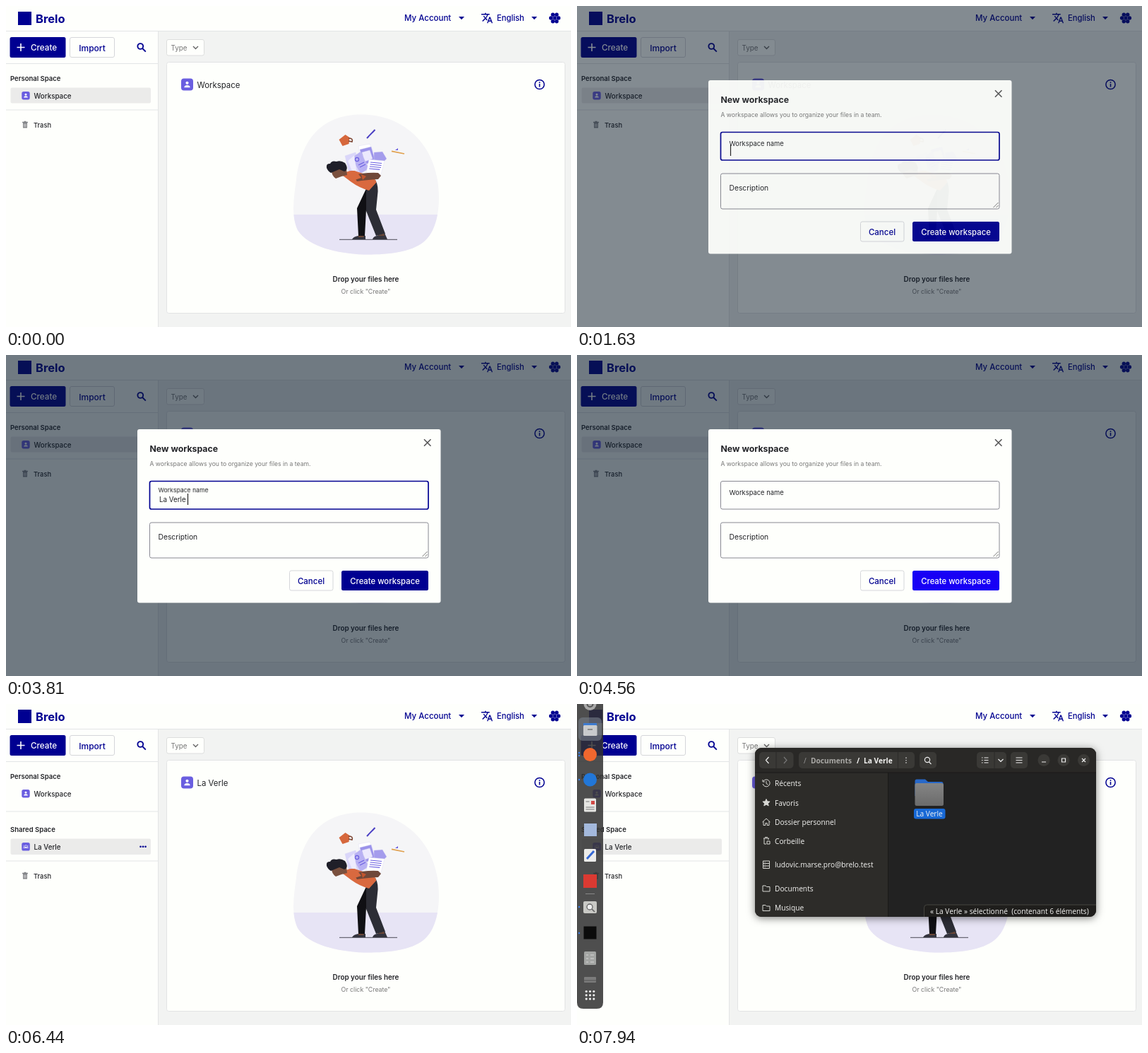
These frames come from a looping animation (800x454 px, 8 s). An HTML page:

```html
<!DOCTYPE html>
<html lang="en">
<head>
<meta charset="utf-8">
<title>File workspace</title>
<style>
html, body { margin: 0; width: 100%; height: 100%; overflow: hidden; background: #fefffc; }
svg { display: block; }
text { font-family: Inter, sans-serif; dominant-baseline: central; fill: #222327; font-size: 9.8px; font-weight: 500; white-space: pre; }
.b { font-weight: 600; font-size: 9.5px; }
.h { font-size: 11.4px; font-weight: 400; }
.navy { fill: #000091; }
.inv { fill: #fff; }
.soft { fill: #777; font-weight: 400; }
.mid { text-anchor: middle; }
.sys text { font-family: "Open Sans", "Noto Sans", sans-serif; font-size: 10.2px; fill: #f5f5f3; font-weight: 400; }
.sys .bold { font-weight: 700; }
.line { fill: none; stroke: #e3e5e6; }
.ico { fill: none; stroke: #d8d8d4; stroke-width: 1; }
#win { transform-box: fill-box; transform-origin: center; }
#label { transform-origin: 215.5px 194px; }
</style>
</head>
<body>
<svg width="800" height="454" viewBox="0 0 800 454">
<defs>
  <g id="badge">
    <rect width="17" height="17" rx="4" fill="#6a5ee0"/>
    <circle cx="8.5" cy="6.3" r="2.1" fill="#fff"/>
    <path d="M4.3 12.7c0-4.4 8.4-4.4 8.4 0z" fill="#fff"/>
  </g>
  <g id="team">
    <rect width="11.5" height="11.5" rx="2.6" fill="#6a5ee0"/>
    <path d="M2.2 7.8c0-1.8 2.4-1.8 2.4 0zM4.5 7.8c0-2.6 2.7-2.6 2.7 0zM7 7.8c0-1.8 2.4-1.8 2.4 0z" fill="#fff"/>
    <path d="M3.4 5h.1M5.8 4h.1M8.2 5h.1" stroke="#fff" stroke-width="1.5" stroke-linecap="round"/>
  </g>
  <g id="bin">
    <path d="M-3-3H3V4.5H-3z" fill="#85868a"/>
    <path d="M-4-3.5H4M-1.5-4.6H1.5" stroke="#85868a" stroke-width="1.3"/>
    <path d="M-1.1-1.5V3M1.1-1.5V3" stroke="#eee" stroke-width=".9"/>
  </g>
  <path id="dir" class="ico" d="M-5-4h4l1.5 1.5h4.5v6.5h-10z"/>
  <path id="blob" d="M498 153.500C558 151 602 190 611 246C617 286 609 320 591 334C572 349 537 352 506 351.500C470 350 428 341 413 317C403 296 408 268 411 246C417 196 441 156 498 153.500Z"/>
  <clipPath id="blobClip"><use href="#blob"/></clipPath>
  <clipPath id="winClip"><rect x="252" y="62" width="483" height="239" rx="9"/></clipPath>
  <linearGradient id="steel" x1="0" y1="0" x2="0" y2="1"><stop stop-color="#858585"/><stop offset="1" stop-color="#6b6b6b"/></linearGradient>
  <filter id="shade" x="-20%" y="-20%" width="140%" height="150%"><feDropShadow dx="0" dy="2" stdDeviation="3" flood-opacity=".25"/></filter>
  <filter id="deep" x="-20%" y="-20%" width="140%" height="150%"><feDropShadow dx="0" dy="2" stdDeviation="6" flood-opacity=".5"/></filter>
</defs>

<rect width="800" height="454" fill="#fefffc"/>
<rect x="216" y="36" width="584" height="418" fill="#f2f3f2"/>
<path class="line" d="M0 35.500H800M215.500 36V454M0 81.500H215"/>

<!-- header -->
<rect x="17" y="8" width="19" height="19" fill="#000091"/>
<text x="42" y="17.500" class="navy" style="font-size:16.500px;font-weight:700">Brelo</text>
<text x="564" y="17" class="navy" style="font-size:11.500px">My Account</text>
<text x="695" y="17" class="navy" style="font-size:11.200px">English</text>
<path class="navy" d="M641 15h8l-4 4.200zM744 15h8l-4 4.200z"/>
<path class="navy" transform="translate(672.300 8.200) scale(.73)" d="M12.870 15.070l-2.540-2.510.030-.030A17.520 17.520 0 0 0 14.070 6H17V4h-7V2H8v2H1v2h11.170C11.500 7.920 10.440 9.750 9 11.350 8.070 10.320 7.300 9.190 6.690 8h-2c.730 1.630 1.730 3.170 2.980 4.560l-5.090 5.020L4 19l5-5 3.110 3.110.760-2.040zM18.500 10h-2L12 22h2l1.120-3h4.750L21 22h2l-4.500-12zm-2.620 7l1.620-4.330L19.120 17h-3.240z"/>
<g id="dots" class="navy"></g>

<!-- sidebar -->
<rect id="create" x="5.500" y="44" width="79" height="29" rx="2.500" fill="#000091"/>
<path d="M15.500 58.500h11M21 53v11" stroke="#fff" stroke-width="1.600"/>
<text x="35" y="59" class="inv" style="font-size:11.700px">Create</text>
<rect x="90.500" y="44.500" width="63" height="28" rx="2.500" fill="#fefffc" stroke="#d5d6da"/>
<text x="122" y="59" class="navy mid" style="font-size:12px">Import</text>
<g fill="none" stroke="#000091" stroke-width="1.900"><circle cx="190.300" cy="57" r="3.900"/><path d="M193.200 60l4.600 4.600"/></g>
<text x="6" y="102" class="b">Personal Space</text>
<rect id="rowA" x="6.500" y="115.500" width="198.500" height="22" rx="2" fill="#ebebea"/>
<use href="#badge" transform="translate(22.300 121) scale(.67)"/>
<text x="39.500" y="127">Workspace</text>
<g id="shared">
  <path class="line" d="M0 152H215"/>
  <text x="6" y="177" class="b">Shared Space</text>
  <rect id="rowB" x="6.500" y="190.500" width="198.500" height="22.500" rx="2" fill="#ebebea"/>
  <use href="#team" x="22.300" y="196"/>
  <text x="39.500" y="202">La Verle</text>
  <path id="more" d="M190.500 201.700h.1M194 201.700h.1M197.500 201.700h.1" stroke="#000091" stroke-width="2.600" stroke-linecap="round"/>
</g>
<g id="trash">
  <path class="line" d="M0 147H215"/>
  <use href="#bin" x="27" y="168"/>
  <text x="39" y="168" style="font-size:9.300px">Trash</text>
</g>

<!-- main panel -->
<rect x="227.500" y="47.500" width="53" height="22.500" rx="2.500" fill="#fefffc" stroke="#dcdddd"/>
<text x="233.500" y="59" class="soft">Type</text>
<path d="M265 57l3.500 3.500 3.500-3.500" fill="none" stroke="#666" stroke-width="1.400"/>
<rect x="227.500" y="79.500" width="564" height="355" rx="3" fill="#fefffc" stroke="#e2e3e4"/>
<use href="#badge" x="248" y="102.500"/>
<text id="titleA" x="270.500" y="111.500" class="h">Workspace</text>
<text id="titleB" x="270.500" y="111.500" class="h">La Verle</text>
<circle cx="755.500" cy="111" r="6.600" fill="none" stroke="#000091" stroke-width="1.500"/>
<path d="M755.500 110v4.400M755.500 107.300v1.600" stroke="#000091" stroke-width="1.600"/>

<g id="art">
  <use href="#blob" fill="#f5f5f7"/>
  <rect x="400" y="295" width="220" height="60" fill="#e7e4f5" clip-path="url(#blobClip)"/>
  <path d="M472 330.300H554" stroke="#3a3a46" stroke-width=".9"/>
  <!-- papers -->
  <g stroke="#d9d6f3" stroke-width=".4">
    <path d="M480 212l15-5 8 28-17 2z" fill="#dad6fa"/>
    <path d="M499 198l16-3 7 15-19 14z" fill="#fff"/>
    <path d="M501 203l16-4 6 20-17 6z" fill="#9b92ea"/>
    <path d="M504 207l11-3 4 12-11 4z" fill="#ece9fd"/>
    <path d="M521 207l12-1 6 10-8 8-10-4z" fill="#a49cec"/>
    <path d="M489 215l13-9 12 24-12 7z" fill="#b8b1f3"/>
    <path d="M514 217l22 2-5 19-21-2z" fill="#fff"/>
    <path d="M484 219l9-8 4 25-8-4z" fill="#eeecfd"/>
  </g>
  <circle cx="497" cy="217" r="2.600" fill="none" stroke="#6a5ee0" stroke-width="1.200"/>
  <path d="M516 221l16 1.500M515.500 224l16 1.500M515 227l16 1.500M514.300 230l15 1.400M499 225l8-4M501 228l8-4" stroke="#6a5ee0" stroke-width="1.100"/>
  <!-- flying things -->
  <path d="M471.500 189l9-7 6 4-1 9-9 3z" fill="#d6673c"/>
  <path d="M485 187q7 0 5 5l-5-1" fill="none" stroke="#7c4431" stroke-width="1.600"/>
  <path d="M511 187L522.500 175" stroke="#4a3fc2" stroke-width="2"/><path d="M514 185l5-5" stroke="#a9a2f0" stroke-width=".8"/>
  <path d="M546 205.300L564 209" stroke="#e0a04e" stroke-width="1.700"/><path d="M551 204l4-3v3z" fill="#6a5ee0"/>
  <!-- figure -->
  <path d="M513 252L497 286L499 325H508L510 288L526 260z" fill="#101014"/>
  <path d="M510 256Q514 246 523 246Q528 255 526 268L524 288L537 322L524 325L510 290z" fill="#2c2d35"/>
  <path d="M490 330q2-4 9-5h10v5zM519 330q1-4 6-5l11-4 4 9z" fill="#34343e"/>
  <path d="M499 325h8l-1 2h-7zM526 325l9-3 1 3z" fill="#6b4635"/>
  <path d="M477 240Q481 232 493 233L515 240Q525 245 524 250L514 261Q500 257 489 249z" fill="#d9693f"/>
  <path d="M492 240Q507 235 527 236L531 240L527 245Q510 246 497 248z" fill="#70483a"/>
  <path d="M481 237Q487 231 496 234L503 243L488 248z" fill="#d9693f"/>
  <path d="M503 238l7 3-5 5z" fill="#c4552e"/>
  <path d="M461 233L474 226L482 230L483 239L475 241L467 244Q461 240 461 233z" fill="#7a503e"/>
  <path d="M454 229Q453 222 459 223Q461 218 468 220Q474 218 480 222Q486 231 479 234L472 231L460 236Q456 234 454 229z" fill="#1f1f29"/>
</g>
<text x="509.500" y="386" class="b mid" style="font-size:9.900px">Drop your files here</text>
<text x="509.500" y="403" class="soft mid" style="font-size:8.800px">Or click "Create"</text>

<!-- create menu -->
<g id="menu">
  <rect x="6" y="79" width="135" height="59" rx="2" fill="#fefffc" filter="url(#shade)"/>
  <rect id="pick" x="6" y="108.500" width="135" height="29.500" rx="2" fill="#eaeae9"/>
  <path d="M19 88h5l2 1.800h7v2H22l-3 6z" fill="#333"/><path d="M22.500 92.500h12l-2.500 7H19.500z" fill="#333"/>
  <rect x="19.500" y="116" width="14" height="14" rx="1.500" fill="#fff" stroke="#333" stroke-width="1.700"/>
  <path d="M21.500 128c0-5 8-5 8 0z" fill="#333"/><circle cx="25" cy="121" r="2" fill="#333"/><path d="M29 119q3 1.500 0 4l2.500 4" fill="none" stroke="#333" stroke-width="1.300"/>
  <text x="46.500" y="94" style="font-size:10.200px">New folder</text>
  <text x="46.500" y="123.500">New workspace</text>
</g>

<!-- dialog -->
<rect id="veil" width="800" height="454" fill="#0c1a2b" fill-opacity=".58"/>
<g id="dialog">
  <rect x="186" y="105" width="429.500" height="245.500" rx="3" fill="#fefffc"/>
  <text x="203.500" y="132.500" style="font-size:12.300px;font-weight:700">New workspace</text>
  <path d="M592 119.300l9.500 9.500M601.500 119.300l-9.500 9.500" stroke="#555" stroke-width="1.600"/>
  <text x="203.500" y="153.500" class="soft" style="font-size:8.600px">A workspace allows you to organize your files in a team.</text>
  <rect id="field" x="203.500" y="178.500" width="394.500" height="39.500" rx="2.500" fill="none"/>
  <text id="label" x="215.500" y="194.500" style="font-size:9.400px;font-weight:400">Workspace name</text>
  <g id="typed">
    <text x="217" y="204.500" style="font-weight:400">L</text>
    <text x="217" y="204.500" style="font-weight:400">La</text>
    <text x="217" y="204.500" style="font-weight:400">La Verle</text>
  </g>
  <path id="caret" d="M217.500 196V212" stroke="#222" stroke-width="1.200"/>
  <rect x="203.500" y="237" width="394.500" height="50" rx="2.500" fill="none" stroke="#888892"/>
  <text x="215.500" y="256.500" style="font-size:10.300px;font-weight:400">Description</text>
  <path d="M589.500 285l7-7M593.500 285l3-3" stroke="#777"/>
  <rect x="401.500" y="305" width="61.500" height="28" rx="2.500" fill="#fefffc" stroke="#d5d6da"/>
  <text x="432" y="319.500" class="navy mid" style="font-size:11.500px">Cancel</text>
  <rect id="submit" x="475" y="305" width="123" height="28" rx="2.500"/>
  <text x="536.500" y="319.500" class="inv mid" style="font-size:11.300px">Create workspace</text>
  <g id="hints" class="sys">
    <rect x="215.500" y="212" width="370.500" height="36" rx="5" fill="#282825"/>
    <rect id="hint" x="216" y="230" width="369.500" height="14.500" fill="#51514d"/>
    <text x="220.500" y="223">La Verle</text>
    <text x="220.500" y="237.500">La Verle Numérique de l'Orée</text>
  </g>
</g>

<!-- file manager -->
<g id="win" class="sys">
  <rect x="252" y="62" width="483" height="239" rx="9" fill="#232220" filter="url(#deep)"/>
  <g clip-path="url(#winClip)">
    <path d="M252 62H735V97H252z" fill="#292826"/>
    <path d="M252 97H440V301H252z" fill="#2d2c29"/>
    <path d="M440.500 97V301M252 97H735" stroke="#1a1918"/>
    <g fill="#3a3936">
      <rect x="258" y="68" width="48.500" height="23" rx="5"/><rect x="314" y="68" width="164" height="23" rx="5"/>
      <rect x="485" y="68" width="24" height="23" rx="5"/><rect x="566" y="68" width="42" height="23" rx="5"/>
      <rect x="614" y="68" width="24" height="23" rx="5"/>
      <circle cx="661" cy="79.500" r="8.500"/><circle cx="689" cy="79.500" r="8.500"/><circle cx="717.500" cy="79.500" r="8.500"/>
    </g>
    <path d="M282 68v23M454.500 68v23M591 68v23" stroke="#2b2a28"/>
    <g fill="none" stroke="#eee" stroke-width="1.200">
      <path d="M271.500 75l-4 4.500 4 4.500M596.500 78l3.500 3.500 3.500-3.500M621.500 76h9M621.500 79.500h9M621.500 83h9M573 76h1.500M576.500 76h6M573 79.500h1.500M576.500 79.500h6M573 83h1.500M576.500 83h6M658 82h6M686.500 77h5v5h-5zM715 77l5 5M720 77l-5 5M498.500 82l3 3"/>
      <circle cx="496" cy="79" r="3.600"/>
      <path d="M466 75.500v1.400M466 78.900v1.400M466 82.300v1.400"/>
      <path d="M293 75l4 4.500-4 4.500" stroke="#777"/>
    </g>
    <text x="321" y="79.500" style="fill:#999">/</text>
    <text x="331" y="79.500" class="bold" style="fill:#aaa9a6">Documents</text>
    <text x="396" y="79.500" class="bold">/</text>
    <text x="406" y="79.500" class="bold">La Verle</text>
    <g id="places"></g>
    <g class="ico">
      <path d="M264 109a5 5 0 1 1-.8 4M268 109v3.500l2.500 1.500M263 107v3h3"/>
      <path d="M268 134.500l1.500 3.300 3.600.3-2.700 2.400.8 3.500-3.200-1.900-3.200 1.900.8-3.500-2.700-2.400 3.600-.3z" fill="#d8d8d4"/>
      <path d="M262.500 167l5.500-5 5.500 5M264 166v5.500h2.800v-3h2.400v3h2.800v-5.500"/>
      <path d="M264 190h8M266 188.500h4M265 190v8h3M271 190v2M269 194h4v4h-4z"/>
      <path d="M263.500 222h9v10.500h-9zM263.500 225.500h9M263.500 229h9M265.500 223.800h1M265.500 227.300h1M265.500 230.800h1"/>
    </g>
    <use href="#dir" x="268" y="261"/><use href="#dir" x="268" y="288.500"/>
    <rect id="hover" x="462" y="101" width="74" height="64" rx="5" fill="#fff" fill-opacity=".05"/>
    <path d="M478.500 109q0-2.500 2.500-2.500h12l4 3.500h19q2.500 0 2.500 2.500V130h-40z" fill="#2868c8"/>
    <rect x="478.500" y="112" width="40.500" height="32" rx="2.500" fill="url(#steel)"/>
    <rect id="chosen" x="477" y="148" width="44.500" height="14.500" rx="3" fill="#1869d6"/>
    <text x="499" y="155.300" class="mid">La Verle</text>
    <g id="status">
      <path d="M491.500 302V288q0-4 4-4H736V302z" fill="#1f1e1c" stroke="#45443f"/>
      <text x="500" y="292.500">« La Verle » sélectionné  (contenant 6 éléments)</text>
    </g>
  </g>
</g>

<!-- dock -->
<g id="dock">
  <path d="M0 0H37V422Q37 431 28 431H9Q0 431 0 422z" fill="#323232" fill-opacity=".86"/>
  <rect id="active" x="2" y="19" width="33" height="33" rx="6" fill="#777f8a" fill-opacity=".6"/>
  <circle cx="18.500" cy="0" r="9" fill="#a9a9a9"/><circle cx="18.500" cy="0" r="4" fill="none" stroke="#555" stroke-width="2"/>
  <path d="M9 27h19v7H9z" fill="#3d7bd0"/><rect x="9" y="30" width="19.500" height="15" rx="1.500" fill="#c9cbcd"/><path d="M15 36h7" stroke="#777" stroke-width="1.500"/>
  <circle cx="18.500" cy="71.500" r="9.500" fill="#f0672e"/>
  <circle cx="18.500" cy="107" r="9.500" fill="#2277d8"/>
  <rect x="10" y="133.500" width="17" height="19" rx="1.500" fill="#e6e6e3"/><path d="M12.500 138h5M12.500 146h12M12.500 149h12" stroke="#777"/><path d="M20 137h5v5h-5z" fill="#d24a45"/>
  <rect x="10" y="169" width="18" height="18" fill="#a3b8dc"/>
  <rect x="10" y="205" width="17" height="18" rx="1.500" fill="#ececea"/><path d="M14 219l10-11" stroke="#3568d4" stroke-width="3"/>
  <rect x="9" y="241" width="19" height="19" fill="#db3a32"/>
  <path d="M12 268.500h13" stroke="#888"/>
  <rect x="9" y="279" width="19" height="17" rx="2" fill="#c9c9c5"/><circle cx="18" cy="287" r="4" fill="#eee" stroke="#666" stroke-width="1.300"/><path d="M21 290l4 4" stroke="#666" stroke-width="1.700"/>
  <rect x="9.500" y="314.500" width="18" height="18" fill="#0c0c0c"/>
  <rect x="10" y="350" width="17" height="19" rx="1.500" fill="#a3a5a3"/><path d="M13 355h3M13 360h3M13 365h3M19 355h5M19 360h5M19 365h5" stroke="#d5d5d5"/>
  <rect x="10" y="386" width="17" height="8" rx="1" fill="#7b7b7b"/><path d="M10 391h17" stroke="#555"/>
  <path d="M3 69h.1M3 73h.1M3 107h.1M3 287h.1M3 324h.1" stroke="#3d7fe8" stroke-width="2.400" stroke-linecap="round"/>
  <g id="apps" fill="#efefef"></g>
</g>
</svg>

<script>
const LOOP = 8000, NAVY = '#000091', BRIGHT = '#1800f5', NS = 'http://www.w3.org/2000/svg';
const $ = id => document.getElementById(id);

function add(parent, tag, attrs, text = '') {
  const el = document.createElementNS(NS, tag);
  for (const k in attrs) el.setAttribute(k, attrs[k]);
  el.textContent = text;
  $(parent).append(el);
}
const dot = (parent, cx, cy, r) => add(parent, 'circle', { cx, cy, r });

dot('dots', 777, 17, 2.7);
for (let i = 0; i < 6; i++) {
  const a = i * Math.PI / 3;
  dot('dots', 777 + 5.4 * Math.cos(a), 17 + 5.4 * Math.sin(a), 2.7);
}
for (let i = 0; i < 9; i++) dot('apps', 13.2 + i % 3 * 5.3, 406.5 + Math.floor(i / 3) * 5.3, 1.6);

[[112, 'Récents'], [139.5, 'Favoris'], [166.5, 'Dossier personnel'], [193.5, 'Corbeille'],
 [227, 'ludovic.marse.pro@brelo.test'], [261, 'Documents'], [288, 'Musique']]
  .forEach(([y, name]) => add('places', 'text', { x: 280, y }, name));

// Rows are [ms, value, easing]; a row holds until the next unless eased.
function play(el, prop, rows) {
  const frames = rows.map(([t, v, easing = 'step-end']) => ({ offset: t / LOOP, [prop]: v, easing }));
  frames.push({ offset: 1, [prop]: rows.at(-1)[1] });
  el.animate(frames, { duration: LOOP, iterations: Infinity });
}
const show = (el, from, to = LOOP) =>
  play(el, 'opacity', [...(from > 0 ? [[0, 0]] : []), [from, 1], ...(to < LOOP ? [[to, 0]] : [])]);

// create menu
play($('create'), 'fill', [[0, NAVY], [310, NAVY, 'ease'], [440, BRIGHT], [750, BRIGHT, 'ease'], [880, NAVY]]);
play($('menu'), 'opacity', [[0, 0], [560, 0, 'linear'], [690, 1], [1560, 0]]);
show($('pick'), 1380);

// dialog
play($('veil'), 'opacity', [[0, 0], [1560, .35], [1630, .87], [1690, 1], [4630, .4], [4690, 0]]);
play($('dialog'), 'opacity', [[0, 0], [1560, .35], [1630, .94], [1690, 1], [4630, .4], [4690, 0]]);
play($('field'), 'stroke', [[0, NAVY], [4440, '#888892']]);
play($('field'), 'strokeWidth', [[0, '1.7px'], [4440, '1px']]);
play($('label'), 'transform', [
  [0, 'none'], [1690, 'none', 'ease'], [1810, 'translateY(-3.5px) scale(.92)'], [4500, 'none']]);
[[2380, 2630], [2630, 3190], [3190, 4500]].forEach(([a, b], i) => show($('typed').children[i], a, b));
play($('caret'), 'transform', [
  [0, 'none'], [2380, 'translateX(5.5px)'], [2630, 'translateX(11px)'], [3190, 'translateX(40px)']]);
show($('caret'), 0, 4440);
show($('hints'), 2630, 3250);
play($('hint'), 'transform', [[0, 'none'], [2940, 'translateY(-14.5px)']]);
play($('submit'), 'fill', [[0, NAVY], [4060, NAVY, 'ease'], [4200, BRIGHT]]);

// new space in the sidebar
show($('shared'), 5310);
play($('trash'), 'transform', [[0, 'none'], [5310, 'translateY(75px)']]);
show($('rowA'), 0, 5940);
play($('rowB'), 'opacity', [[0, 0], [5690, .5], [5940, 1]]);
show($('more'), 5690, 6500);
show($('titleA'), 0, 5940);
show($('titleB'), 5940);
play($('art'), 'opacity', [[0, 1], [5940, .3, 'linear'], [6120, 1]]);

// desktop
play($('dock'), 'transform', [[0, 'translateX(-40px)'], [6500, 'translateX(-40px)', 'ease-out'], [6750, 'none']]);
show($('active'), 6800);
play($('win'), 'opacity', [[0, 0], [6980, 0, 'ease-out'], [7120, 1]]);
play($('win'), 'transform', [[0, 'scale(.7)'], [6980, 'scale(.7)', 'ease-out'], [7190, 'none']]);
show($('hover'), 7500, 7690);
show($('chosen'), 7690);
show($('status'), 7690);
</script>
</body>
</html>
```
